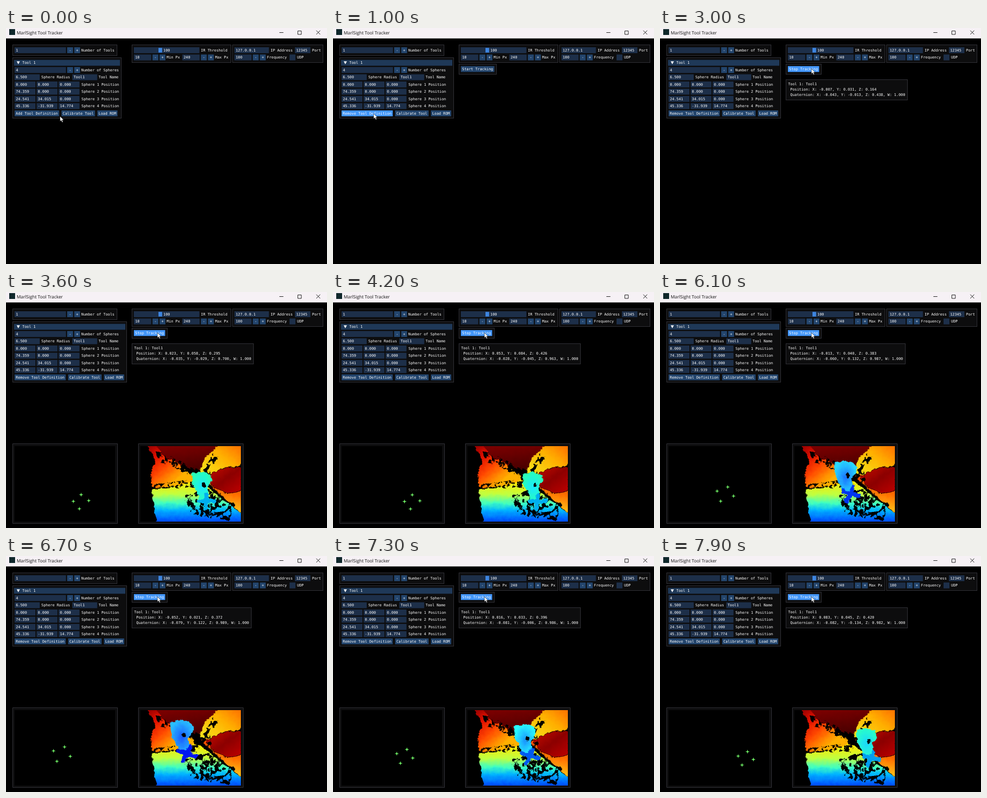
An HTML page for the animation above (8 s loop, 600 by 441 pixels).

```html
<!DOCTYPE html>
<html lang="en">
<head>
<meta charset="utf-8">
<title>Tool Tracker</title>
<style>
  html, body { margin: 0; width: 100%; height: 100%; overflow: hidden; background: #000; }
  svg { display: block; width: 100vw; height: 100vh; }
  text { white-space: pre; text-rendering: geometricPrecision; }
  #ui text { font: 6.87px "DejaVu Sans Mono", monospace; fill: #fff; }
  .title { font: 8.4px "Open Sans", sans-serif; fill: #111; }
  .panel { fill: #0d0d0e; stroke: #303036; }
  .field { fill: #1d2f49; }
  .button { fill: #23456d; }
  .hover { fill: #4296fa; }
</style>
</head>
<body>
<svg viewBox="0 0 600 441">
  <defs>
    <clipPath id="view"><rect x="251" y="288" width="188" height="141"/></clipPath>
    <filter id="ragged" filterUnits="userSpaceOnUse" x="241" y="278" width="208" height="161" color-interpolation-filters="sRGB">
      <feTurbulence type="fractalNoise" baseFrequency=".13" numOctaves="3" seed="4"/>
      <feDisplacementMap in="SourceGraphic" scale="7" xChannelSelector="R" yChannelSelector="G"/>
    </filter>
    <filter id="speckle" filterUnits="userSpaceOnUse" x="241" y="278" width="208" height="161" color-interpolation-filters="sRGB">
      <feTurbulence type="fractalNoise" baseFrequency=".11" numOctaves="3" seed="9"/>
      <feColorMatrix values="0 0 0 0 0  0 0 0 0 0  0 0 0 0 0  18 0 0 0 -8.6"/>
      <feComposite in2="SourceGraphic" operator="in"/>
    </filter>
    <linearGradient id="far" x1="0" y1="0" x2=".3" y2="1">
      <stop stop-color="#800000"/><stop offset="1" stop-color="#480000"/>
    </linearGradient>
    <linearGradient id="slab" gradientUnits="userSpaceOnUse" x1="264" y1="290" x2="318" y2="352">
      <stop stop-color="#980000"/><stop offset=".3" stop-color="#e01000"/>
      <stop offset=".6" stop-color="#ff4800"/><stop offset="1" stop-color="#ffb000"/>
    </linearGradient>
    <linearGradient id="table" gradientUnits="userSpaceOnUse" x1="0" y1="354" x2="0" y2="429">
      <stop stop-color="#ffe600"/><stop offset=".32" stop-color="#c0ff40"/><stop offset=".54" stop-color="#40ffc0"/>
      <stop offset=".72" stop-color="#00b4ff"/><stop offset="1" stop-color="#0048ff"/>
    </linearGradient>
    <linearGradient id="wedge" x1="1" y1="0" x2="0" y2="1">
      <stop stop-color="#ff6a00"/><stop offset=".4" stop-color="#ffb000"/><stop offset="1" stop-color="#f4f020"/>
    </linearGradient>
    <linearGradient id="side" x1=".6" y1="0" x2=".4" y2="1">
      <stop stop-color="#f02000"/><stop offset=".5" stop-color="#ff7000"/><stop offset="1" stop-color="#ffe020"/>
    </linearGradient>
    <linearGradient id="person" x1="0" y1="0" x2="1" y2="1">
      <stop stop-color="#c80c00"/><stop offset=".5" stop-color="#8c0000"/><stop offset="1" stop-color="#c00000"/>
    </linearGradient>
    <radialGradient id="skin">
      <stop id="near"/><stop id="edge" offset="1"/>
    </radialGradient>
  </defs>
  <rect width="600" height="441"/>
  <rect width="600" height="19.5" fill="#f6f1f5"/>
  <rect x="6" y="2" width="11" height="11" fill="#10282c"/>
  <text class="title" x="20" y="11.5">MarlSight Tool Tracker</text>
  <path d="M511 8.5h7.5M545.5 5.5h6.5v6.5h-6.5zM580 4.7l7.3 7.3m0-7.3l-7.3 7.3" fill="none" stroke="#222"/>
  <g id="ui"></g>
  <g id="cameras">
    <path class="panel" d="M12.5 283.5h196v149h-196zM247.5 283.5h196v149h-196z"/>
    <path d="M16 288h188v141h-188zM251 288h188v141h-188z"/>
    <g id="stars" fill="#72f768"></g>
    <g clip-path="url(#view)">
      <g filter="url(#ragged)">
        <polygon fill="url(#far)" points="280,286 402,286 382,305 366,337 345,330 290,312"/>
        <polygon fill="url(#slab)" points="263,286 280,286 296,309 318,317 350,343 354,361 300,364 273,365 270,340 280,317"/>
        <polygon fill="url(#table)" points="272,368 320,363 356,350 378,366 441,415 441,432 282,432"/>
        <polygon fill="url(#wedge)" points="398,285 441,285 441,321 384,349 360,335 374,308"/>
        <polygon fill="url(#side)" points="364,344 441,330 441,415"/>
        <polygon fill="url(#person)" stroke="#200000" points="374,345 402,330 441,326 441,370 412,377 386,363"/>
        <g filter="url(#speckle)">
          <polygon points="280,296 296,302 364,335 352,348 308,324 286,318"/>
          <polygon points="272,361 318,354 358,350 362,367 308,366 272,369"/>
          <polygon points="388,300 400,304 382,335 384,360 362,346"/>
          <polygon points="332,382 378,366 428,398 416,428 348,416"/>
        </g>
        <g id="tool">
          <polygon fill="url(#skin)" points="-30,-56 -8,-60 8,-54 12,-42 2,-28 5,-4 -12,2 -20,-20 -28,-34"/>
          <ellipse cx="-5" cy="-33" rx="3" ry="4.5"/>
          <path id="cross" stroke-width="8" stroke-linecap="round"/>
        </g>
      </g>
    </g>
  </g>
  <path id="cursor" d="M0 0v9.5l2.2-2 1.7 3.8 1.7-.8-1.7-3.6h3z" fill="#fff" stroke="#000" stroke-width=".5"/>
</svg>
<script>
const LOOP = 8000, STEP = 100, ADVANCE = 4.136;
const ADDED = 700, STARTED = 2700, REPORTED = 2800, STREAMED = 3200, SETTLED = 4200;
const $ = id => document.getElementById(id);

// Each row is a time followed by the values reached at that time.
const cursorKeys = [[200, 101, 165], [700, 76, 160], [1000, 76, 160], [1300, 95, 180], [2300, 283, 76]];
const poseKeys = [
  [3000, -.007, .031, .164, -.043, -.013, .438],
  [SETTLED, .053, .084, .426, -.028, -.045, .963],
  [5400, .033, .062, .395, -.038, .144, .985],
  [6700, -.052, .021, .372, -.079, .122, .989],
  [7900, .083, .045, .420, -.082, -.134, .982]
];
const spheres = [[-14, -4.5], [5, -12.5], [16, 3.5], [-7, 13.5]];

function at(keys, t) {
  const next = keys.findIndex(k => k[0] >= t);
  if (next === 0) return keys[0].slice(1);
  if (next < 0) return keys.at(-1).slice(1);
  const a = keys[next - 1], b = keys[next], p = (t - a[0]) / (b[0] - a[0]);
  return a.slice(1).map((v, i) => v + (b[i + 1] - v) * p);
}

const rect = (cls, x, y, w, h) => `<rect class="${cls}" x="${x}" y="${y}" width="${w}" height="${h}"/>`;
const panel = (x, y, w, h) => rect('panel', x + .5, y + .5, w - 1, h - 1);
const text = (x, row, s, anchor = 'start') => `<text x="${x}" y="${row + 2.4}" text-anchor="${anchor}">${s}</text>`;
const field = (x, row, w, s = '') => rect('field', x, row - 5.5, w, 11) + text(x + 2.4, row, s);
const stepper = (x, row, w, value, label) =>
  field(x, row, w, value) +
  ['-', '+'].map((s, i) => {
    const left = x + w + 2.3 + i * 13.2;
    return rect('button', left, row - 5.5, 11, 11) + text(left + 5.5, row, s, 'middle');
  }).join('') + text(x + w + 28.8, row, label);

function button(x, row, s, [cx, cy]) {
  const w = s.length * ADVANCE + 4.7;
  const over = cx >= x && cx <= x + w && Math.abs(cy - row) <= 5.5;
  return rect(over ? 'hover' : 'button', x, row - 5.5, w, 11) + text(x + 2.35, row, s);
}

function toolPanel(t, pointer) {
  const added = t >= ADDED, width = added ? 214 : 204, shift = added ? 12.4 : 0;
  const positions = ['0.000 0.000 0.000', '74.359 0.000 0.000', '24.541 34.015 0.000', '45.336 -31.939 14.774'];
  return panel(12, 55, width, 114) +
    `<rect x="15" y="59.5" width="${width - 6}" height="11" fill="#1f3958"/>` +
    '<path d="M20 62.3h6l-3 5.4z" fill="#fff"/>' + text(30.5, 65, 'Tool 1') +
    stepper(16, 78.5, 96, '4', 'Number of Spheres') +
    field(16, 92, 47, '6.500') + text(66, 92, 'Sphere Radius') +
    field(124, 92, 46.5, 'Tool1') + text(173, 92, 'Tool Name') +
    positions.map((position, i) => {
      const row = 105.5 + i * 13.5;
      return position.split(' ').map((v, j) => field(16 + j * 41.2, row, 39, v)).join('') +
        text(141, row, `Sphere ${i + 1} Position`);
    }).join('') +
    button(16, 159.5, added ? 'Remove Tool Definition' : 'Add Tool Definition', pointer) +
    button(103.7 + shift, 159.5, 'Calibrate Tool', pointer) +
    button(170.7 + shift, 159.5, 'Load ROM', pointer);
}

function settings() {
  return panel(12, 31, 196, 21) + stepper(16, 41.5, 96, '1', 'Number of Tools') +
    panel(235, 31, 186, 34) + field(239, 41.5, 122.5) +
    '<rect x="285" y="37.2" width="6.8" height="8.6" fill="#3d85e0"/>' +
    text(300.3, 41.5, '100', 'middle') + text(364.3, 41.5, 'IR Threshold') +
    stepper(239, 55, 32.5, '10', 'Min Px') + stepper(329.5, 55, 32.5, '240', 'Max Px') +
    panel(423, 31, 170, 34) + field(427, 41.5, 64.5, '127.0.0.1') + text(494.5, 41.5, 'IP Address') +
    field(540, 41.5, 29, '12345') + text(572, 41.5, 'Port') +
    stepper(427, 55, 32, '100', 'Frequency') + field(530, 55, 11) + text(544, 55, 'UDP');
}

function report(t) {
  const v = at(poseKeys, t).map(n => n.toFixed(3));
  const axes = values => values.map((n, i) => `${'XYZ'[i]}: ${n}`).join(', ');
  const lines = ['Tool 1: Tool1', ` Position: ${axes(v.slice(0, 3))}`, ` Quaternion: ${axes(v.slice(3))}, W: 1.000`];
  const width = Math.max(...lines.map(s => s.length)) * ADVANCE + 9;
  return panel(235, 96, Math.round(width), 39) + lines.map((s, i) => text(239.4, 104.3 + i * 10.1, s)).join('');
}

function tracking(t, pointer) {
  if (t < ADDED) return '';
  const label = t < STARTED ? 'Start Tracking' : 'Stop Tracking';
  return panel(235, 67, t < STARTED ? 71 : 67, 20) + button(239, 76.7, label, pointer);
}

// Project the pose into the camera: offset by x/z and y/z, size by 1/z, hue by z.
function drawCameras(t) {
  const [x, y, z] = at(poseKeys, t);
  const [, , depth, , , roll] = at(poseKeys, Math.max(t, SETTLED));
  const cx = 126.6 + 166 * x / z, cy = 361 + 155 * y / z;
  const size = .395 / depth, angle = (roll - .985) * 14;
  const hue = 200 - (depth - .395) * 700;
  const color = (shift, light) => `hsl(${hue + shift},100%,${light}%)`;
  const points = spheres.map(([u, v]) => [
    u * Math.cos(angle) - v * Math.sin(angle),
    u * Math.sin(angle) + v * Math.cos(angle)
  ]);
  $('stars').innerHTML = points.map(([u, v]) =>
    `<path d="M${cx + u * size} ${cy + v * size - 4}l.9 3.1 3.1.9-3.1.9-.9 3.1-.9-3.1-3.1-.9 3.1-.9z"/>`).join('');
  $('tool').setAttribute('transform', `translate(${cx + 235} ${cy}) scale(${size})`);
  $('cross').setAttribute('d', points.map(p => `M0 0L${p}`).join(''));
  $('cross').setAttribute('stroke', color(18, 47));
  $('near').setAttribute('stop-color', color(8, 55));
  $('edge').setAttribute('stop-color', color(-18, 58));
}

function draw(t) {
  const pointer = at(cursorKeys, t);
  $('ui').innerHTML = settings() + toolPanel(t, pointer) + tracking(t, pointer) + (t >= REPORTED ? report(t) : '');
  $('cursor').setAttribute('transform', `translate(${pointer})`);
  $('cameras').style.display = t >= STREAMED ? '' : 'none';
  if (t >= STREAMED) drawCameras(t);
}

let shown = -1;
const start = performance.now();
function tick() {
  const t = Math.floor((performance.now() - start) % LOOP / STEP) * STEP;
  if (t !== shown) draw(shown = t);
  requestAnimationFrame(tick);
}
tick();
</script>
</body>
</html>
```
